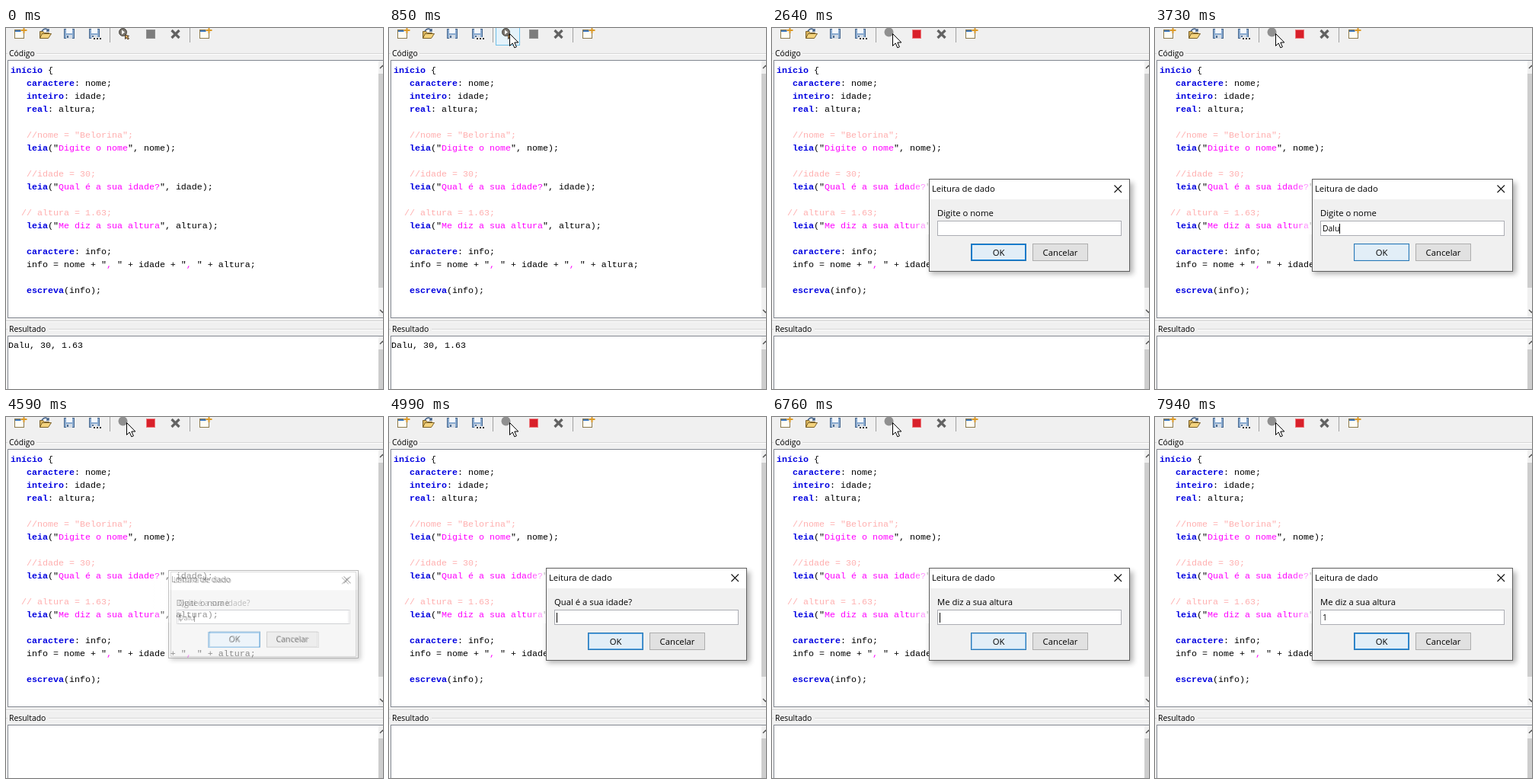
Animation, 495 px wide and 474 px high, one loop 8 s. Source, as an HTML page:

```html
<!DOCTYPE html>
<html lang="pt">
<head>
<meta charset="utf-8">
<style>
html, body { margin: 0; width: 100%; height: 100%; overflow: hidden; background: #f0f0f0; }
svg { display: block; width: 495px; height: 474px; }
text { white-space: pre; font-family: "Open Sans", "Noto Sans", sans-serif; }
.code { font: 11.667px "Liberation Mono", monospace; }
.key { fill: #0000e0; font-weight: bold; }
.str { fill: #f0f; }
.note { fill: #ffafaf; }
.label { font-size: 10.4px; }
.ui { font-size: 11.3px; }
.entry { font-size: 10.4px; }
.px { shape-rendering: crispEdges; }
.shadow { filter: blur(3.5px); }
</style>
</head>
<body>
<svg id="stage" viewBox="0 0 495 474"></svg>
<script>
const LOOP = 8000;
const WHO = "Dalu";
const PROGRAM = `início {
   caractere: nome;
   inteiro: idade;
   real: altura;

   //nome = "Belorina";
   leia("Digite o nome", nome);

   //idade = 30;
   leia("Qual é a sua idade?", idade);

  // altura = 1.63;
   leia("Me diz a sua altura", altura);

   caractere: info;
   info = nome + ", " + idade + ", " + altura;

   escreva(info);`;

// keys: the moments at which each character of the answer is typed
const DIALOGS = [
  { ask: "Digite o nome", answer: WHO, open: 1800, close: 4510, keys: [2950, 3160, 3370, 3570] },
  { ask: "Qual é a sua idade?", answer: "25", open: 4560, close: 6460, keys: [5440, 5780] },
  { ask: "Me diz a sua altura", answer: "1", open: 6510, close: Infinity, keys: [7430] }
];

const rect = (x, y, w, h, fill, more = "") =>
  `<rect class="px" x="${x}" y="${y}" width="${w}" height="${h}" fill="${fill}" ${more}/>`;
const box = (x, y, w, h, fill, line, more = "") =>
  rect(x + .5, y + .5, w - 1, h - 1, fill, `stroke="${line}" ${more}`);
const path = (d, stroke, width = 1, fill = "none") =>
  `<path d="${d}" stroke="${stroke}" stroke-width="${width}" fill="${fill}"/>`;
const text = (x, y, cls, s, more = "") => `<text x="${x}" y="${y}" class="${cls}" ${more}>${s}</text>`;
const span = (cls, s) => `<tspan class="${cls}">${s}</tspan>`;

const highlight = line => line.replace(
  /(\/\/.*)|"([^"]*)"|\b(início|caractere|inteiro|real|leia|escreva)\b/g,
  (all, note, str, key) => note ? span("note", note) : key ? span("key", key) : `"${span("str", str)}"`);

const windowIcon = x =>
  box(x, 2, 13, 12, "#fffdf4", "#8c7a4c") + rect(x + 1, 3, 11, 2, "#3f78bd") +
  path(`M${x + 12.5} -1v8M${x + 8.5} 3h8`, "#f0f0f0", 4) +
  path(`M${x + 12.5} -1v8M${x + 8.5} 3h8`, "#dc9a28", 2);

const floppy = x =>
  box(x, 1, 14, 13, "#88a9cf", "#49698f") + rect(x + 3, 1, 8, 6, "#f5f8fb") +
  rect(x + 3, 9, 8, 5, "#d4dce6") + rect(x + 4, 10, 2, 3, "#49698f");

const folder =
  path("M44.5 13.5v-9h4l2 2h6v3", "#7b6129", 1, "#d9b45c") +
  path("M44.5 13.5l3-6h12l-4 6z", "#7b6129", 1, "#f3d27d") +
  path("M47 4q5-6 9 0m0-3v3h-3", "#3d5d87", 1.4);

const runIcon =
  `<circle cx="153.5" cy="5.5" r="5" fill="#77736c" stroke="#47443f"/>` +
  path("M152 2.5l4 3-4 3z", "none", 0, "#fff") +
  path("M156.5 9l5 1.5-2 1 2 2.5-1.5 1-2-2.5-1.5 2z", "#47392b", 1, "#e3ad5c");

const toolbar =
  windowIcon(11) + folder + floppy(76) + floppy(109) +
  rect(113, 12, 13, 4, "#f0f0f0") + [115, 119, 123].map(x => rect(x, 13, 2, 2, "#333")).join("") +
  [136, 241].map(x => rect(x, 0, 1, 19, "#a0a0a0")).join("") +
  box(140, -8, 32, 31, "#e5f3fb", "#70c0e7", 'id="hover"') +
  `<g id="run">${runIcon}</g><circle id="busy" cx="153.5" cy="5.5" r="6" fill="#909090"/>` +
  box(184, 2, 12, 12, "#7d7d7d", "#8e8e8e", 'id="stop"') +
  path("M217.5 3l10 10m0-10l-10 10", "#626262", 3.2) + windowIcon(254);

const scrollbar = (y, h, thumbY, thumbH) =>
  rect(489, y, 6, h, "#f0f0f0") + rect(489, thumbY, 6, thumbH, "#cdcdcd") +
  path(`M491 ${y + 10}l3.5-3.5 3.5 3.5`, "#505050", 1.4);

const group = (name, y, from) =>
  rect(0, y, 2, 1, "#d5d5d5") + rect(from, y, 495, 1, "#d5d5d5") +
  rect(from, y + 1, 495, 1, "#fff") + text(4, y + 4, "label", name);

const panels =
  group("Código", 33, 40) + box(2, 42, 500, 339, "#fff", "#828790") + scrollbar(43, 337, 60, 281) +
  path("M491 370l3.5 3.5 3.5-3.5", "#505050", 1.4) +
  rect(0, 384, 495, 1, "#cfcfcf") + rect(0, 385, 495, 1, "#fff") +
  group("Resultado", 395, 56) + box(2, 404, 500, 80, "#fff", "#828790") + scrollbar(405, 80, 422, 60) +
  PROGRAM.split("\n").map((line, i) => text(6, 59 + 17 * i, "code", highlight(line))).join("") +
  text(3, 420, "code", WHO + ", 30, 1.63", 'id="result"');

const dialog = d => `<g class="dialog">
  <rect class="shadow" x="208" y="203" width="266" height="120" fill="#000" opacity=".3"/>
  ${rect(178, 199, 28, 72, "url(#fade)")}
  ${box(206, 198, 264, 122, "#f0f0f0", "#5f5f5f")}${rect(207, 199, 262, 26, "#fff")}
  ${text(210, 215, "ui", "Leitura de dado")}
  ${path("M449.5 206.5l9.5 9.5m0-9.5l-9.5 9.5", "#111", 1.1)}
  ${text(217, 247, "ui", d.ask)}
  ${box(217, 253, 242, 20, "#fff", "#abadb3")}
  ${text(220, 267, "entry", "")}
  ${rect(220, 257, 1, 13, "#000", 'data-caret=""')}
  ${box(261, 283, 73, 23, "#e2eef7", "#2a78b5")}
  ${box(262, 284, 71, 21, "none", "#0078d7", 'data-glow=""')}
  ${text(297.5, 298.5, "ui", "OK", 'text-anchor="middle"')}
  ${box(342, 283, 73, 23, "#e1e1e1", "#adadad")}
  ${text(378.5, 298.5, "ui", "Cancelar", 'text-anchor="middle"')}
</g>`;

const pointer =
  `<g id="arrow">${path("M.5 .5v16l3.7-3.6 2.6 6 2.6-1.1-2.6-5.8h5z", "#000", 1, "#fff")}</g>` +
  `<g id="beam">${path("M-3 -8.5h2.5l.5.5.5-.5h2.5M0 -8v16M-3 8.5h2.5l.5-.5.5.5h2.5", "#000")}</g>`;

const stage = document.getElementById("stage");
stage.innerHTML =
  `<defs><linearGradient id="fade"><stop stop-color="#fff" stop-opacity="0"/>
  <stop offset="1" stop-color="#fff" stop-opacity=".75"/></linearGradient></defs>` +
  rect(0, 0, 495, 474, "#f0f0f0") + toolbar + panels + DIALOGS.map(dialog).join("") +
  `<g id="pointer">${pointer}</g>`;

const $ = id => document.getElementById(id);
const show = (node, on) => node.setAttribute("visibility", on ? "inherit" : "hidden");
const clamp = v => Math.max(0, Math.min(1, v));
const easeOut = p => 1 - (1 - p) ** 2;

document.querySelectorAll(".dialog").forEach((node, i) => {
  const find = q => node.querySelector(q);
  Object.assign(DIALOGS[i], {
    node, entry: find(".entry"), caret: find("[data-caret]"), glow: find("[data-glow]")
  });
});

function drawDialog(d, t) {
  const level = t < d.close ? easeOut(clamp((t - d.open) / 250)) : 1 - clamp((t - d.close) / 150);
  const scale = .9 + .1 * level;
  show(d.node, level > 0);
  d.node.setAttribute("opacity", level);
  d.node.setAttribute("transform", `translate(338 259) scale(${scale}) translate(-338 -259)`);

  const typed = d.keys.filter(k => k <= t);
  d.entry.textContent = d.answer.slice(0, typed.length);
  d.caret.setAttribute("x", 220 + Math.round(typed.length ? d.entry.getComputedTextLength() : 0));
  const since = t - (typed.length ? typed[typed.length - 1] : d.open);
  show(d.caret, level > 0 && since % 1000 < 500);
  d.glow.setAttribute("opacity", Math.abs(Math.sin((t - d.open) * Math.PI / 2000)));
}

function draw(t) {
  const p = easeOut(clamp((t - 150) / 700));
  const x = Math.round(402 - 244 * p), y = Math.round(420 - 413 * p);
  const overText = y > 404 || (y > 42 && y < 381);
  const running = t >= 1630;

  $("pointer").setAttribute("transform", `translate(${x} ${y})`);
  show($("pointer"), t >= 150);
  show($("beam"), t >= 150 && overText);
  show($("arrow"), t >= 150 && !overText);
  show($("hover"), !running && x < 172 && y < 23);
  show($("run"), !running);
  show($("busy"), running);
  $("stop").setAttribute("fill", running ? "#d9202a" : "#7d7d7d");
  $("stop").setAttribute("stroke", running ? "#ee7b7f" : "#8e8e8e");
  show($("result"), t < 1780);
  DIALOGS.forEach(d => drawDialog(d, t));
}

const start = performance.now();
function tick() {
  draw((performance.now() - start) % LOOP);
  requestAnimationFrame(tick);
}
tick();
</script>
</body>
</html>
```
